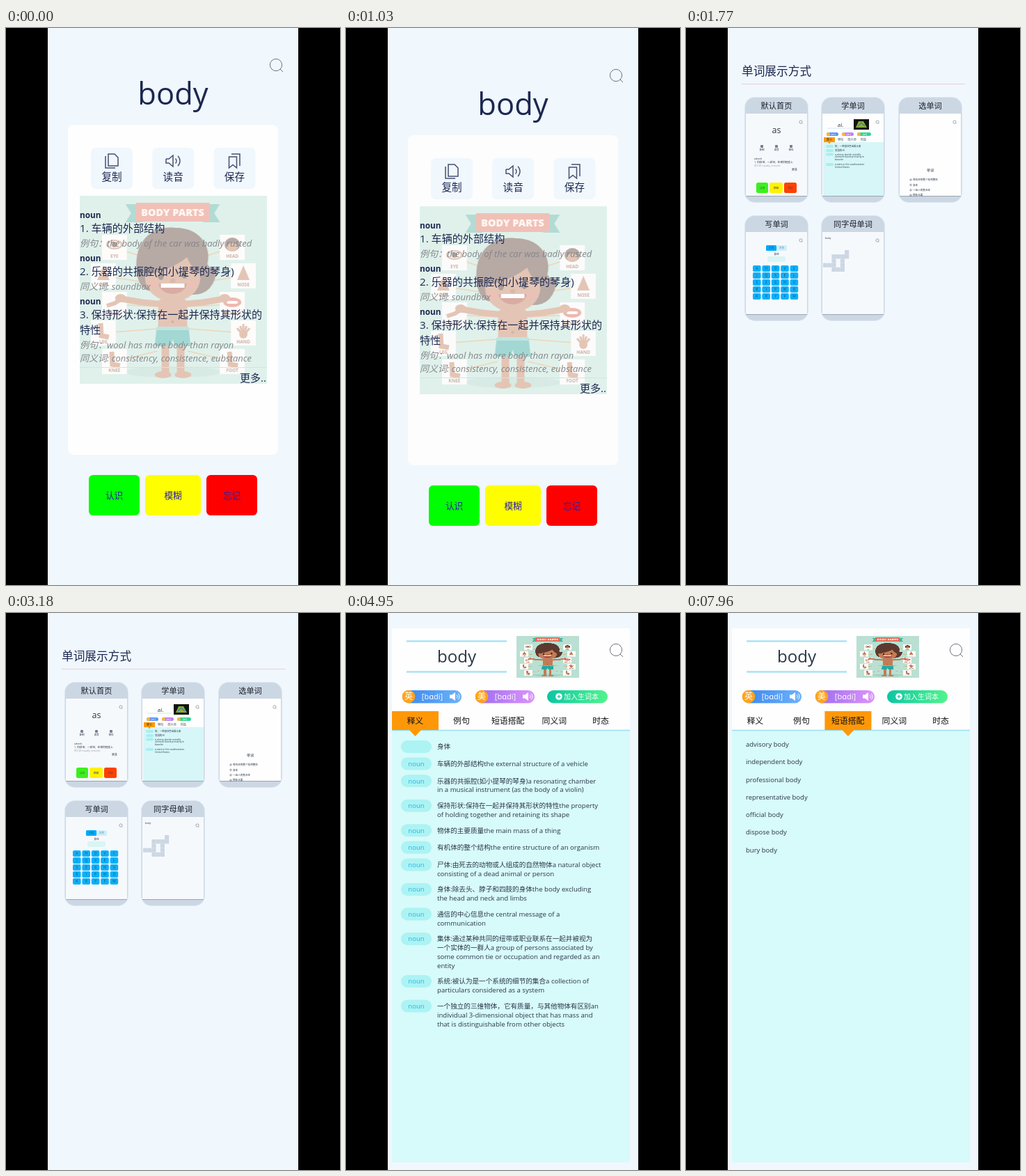
Recreate the animation shown at these times as an HTML page with a canvas. Size 480x800 px, loop 8 s.

```html
<!DOCTYPE html>
<html lang="zh">
<head>
<meta charset="utf-8">
<title>单词展示方式</title>
<style>
html, body { margin: 0; width: 100%; height: 100%; overflow: hidden; background: #000; }
canvas { display: block; width: 480px; height: 800px; }
</style>
</head>
<body>
<canvas id="stage" width="480" height="800"></canvas>
<script>
const LOOP = 8000;
const PAPER = '#f0f7fd', CARD = '#fefefe', NAVY = '#1c2850', INK = '#2a3648';
const FONT = '"Open Sans", "Noto Sans CJK SC", "Noto Sans CJK", sans-serif';
const stage = document.getElementById('stage').getContext('2d');
let c = stage;

// ---------- helpers ----------
const clamp = (v) => Math.max(0, Math.min(1, v));
const span = (t, a, b) => clamp((t - a) / (b - a));
const easeOut = (p) => 1 - (1 - p) * (1 - p);

function layer(paint) {
  const cv = document.createElement('canvas');
  cv.width = 480;
  cv.height = 800;
  c = cv.getContext('2d');
  paint();
  c = stage;
  return cv;
}

// y is the optical middle of the line
function text(str, x, y, size, color, align = 'left', style = '') {
  c.font = `${style} ${size}px ${FONT}`;
  c.fillStyle = color;
  c.textAlign = align;
  c.fillText(str, x, y + size * 0.36);
}

function rect(x, y, w, h, color, r = 0) {
  c.fillStyle = color;
  c.beginPath();
  c.roundRect(x, y, w, h, r);
  c.fill();
}

function oval(x, y, rx, ry, color, a = 0, b = Math.PI * 2) {
  c.fillStyle = color;
  c.beginPath();
  c.ellipse(x, y, rx, ry, 0, a, b);
  c.fill();
}

function line(points, color, w = 1) {
  c.strokeStyle = color;
  c.lineWidth = w;
  c.beginPath();
  points.forEach(([x, y]) => c.lineTo(x, y));
  c.stroke();
}

function poly(points, color) {
  c.fillStyle = color;
  c.beginPath();
  points.forEach(([x, y]) => c.lineTo(x, y));
  c.fill();
}

function ring(x, y, r, color, w = 1, a = 0, b = Math.PI * 2) {
  c.strokeStyle = color;
  c.lineWidth = w;
  c.beginPath();
  c.arc(x, y, r, a, b);
  c.stroke();
}

function search(x, y, s = 1) {
  ring(x, y, 8.6 * s, '#70747c', Math.max(0.6, s));
  line([[x + 6 * s, y + 6 * s], [x + 10 * s, y + 10 * s]], '#70747c', Math.max(0.6, s));
}

// ---------- illustration, drawn on a 270 x 270 grid ----------
function poster(x, y, w, h, alpha) {
  const skin = '#c27c56', hair = '#5c3a30';
  const art = layer(() => {
    rect(0, 0, 270, 270, '#b9e0d2');
    oval(134, 253, 70, 8, '#a5d2c2');
    poly([[66, 12], [90, 12], [90, 38], [66, 38], [74, 25]], '#4fae9e');
    poly([[202, 12], [178, 12], [178, 38], [202, 38], [194, 25]], '#4fae9e');
    rect(81, 10, 106, 27, '#e2705c');
    text('BODY PARTS', 134, 24, 14.5, '#fff6ea', 'center', '800');

    const labels = ['EYE,HEAD', 'EAR,NOSE', 'ARM,MOUTH', 'LEG,HAND', 'KNEE,FOOT'];
    labels.forEach((pair, i) => {
      const cy = 74 + i * 41, shift = i % 2 * 16;
      pair.split(',').forEach((name, side) => {
        const cx = side ? 220 + shift : 50 - shift;
        line([[cx, cy], [134 + (side ? 22 : -22), 95 + i * 32]], '#dca060', 1.5);
        rect(cx - 18, cy - 18, 36, 36, '#fcfbf8');
        if (i === 0 && side) {
          oval(cx, cy - 4, 11, 10, hair);
          oval(cx, cy, 8, 6, skin);
        } else if (i === 0) {
          oval(cx, cy - 4, 12, 7, skin);
          oval(cx, cy - 4, 9, 5, '#fff');
          oval(cx, cy - 4, 4, 4, hair);
        } else if (i === 2 && side) {
          oval(cx, cy - 3, 13, 7, '#d9604c');
          rect(cx - 8, cy - 5, 16, 4, '#fff', 2);
        } else if (i === 2) {
          line([[cx - 11, cy + 2], [cx + 1, cy - 2], [cx + 11, cy - 9]], skin, 6);
        } else if (i === 1) {
          poly([[cx, cy - 15], [cx + 9, cy + 6], [cx - 9, cy + 6]], skin);
        } else if (i === 3 && side) {
          for (let k = -2; k < 3; k++) line([[cx, cy + 4], [cx + k * 4.5, cy - 13 + Math.abs(k) * 3]], skin, 3);
          oval(cx, cy + 2, 6, 6, skin);
        } else {
          line([[cx - 4, cy - 14], [cx - 3, cy + 4], [cx + 8, cy + 6]], skin, 7);
        }
        text(name, cx, cy + 13, 6.5, '#8a5038', 'center', 'bold');
      });
    });

    // bob with flicked ends
    c.fillStyle = hair;
    c.beginPath();
    c.moveTo(82, 106);
    c.bezierCurveTo(78, 62, 108, 42, 138, 46);
    c.bezierCurveTo(178, 46, 190, 78, 184, 98);
    c.quadraticCurveTo(188, 106, 198, 104);
    c.quadraticCurveTo(194, 144, 160, 142);
    c.lineTo(112, 138);
    c.quadraticCurveTo(84, 140, 82, 106);
    c.fill();
    line([[60, 148], [90, 153], [134, 157], [178, 153], [208, 148]], skin, 9);
    oval(59, 147, 8, 6, skin);
    oval(209, 147, 8, 6, skin);
    rect(113, 147, 42, 52, skin, 8);
    rect(118, 205, 11, 50, skin);
    rect(140, 205, 11, 50, skin);
    oval(120, 257, 12, 5, skin);
    oval(149, 257, 12, 5, skin);
    poly([[111, 189], [157, 189], [160, 216], [137, 216], [134, 206], [131, 216], [108, 216]], '#2ca69c');
    rect(111, 188, 46, 5, '#6cc6be');
    oval(134, 181, 2, 2, '#8e5034');

    oval(134, 117, 40, 35, skin);
    c.fillStyle = hair;
    c.beginPath();
    c.moveTo(88, 116);
    c.quadraticCurveTo(92, 66, 134, 66);
    c.quadraticCurveTo(176, 66, 180, 116);
    c.quadraticCurveTo(160, 105, 155, 88);
    c.quadraticCurveTo(130, 108, 88, 116);
    c.fill();
    oval(117, 116, 4, 5, '#3a2418');
    oval(151, 114, 4, 5, '#3a2418');
    oval(106, 128, 7, 5, '#d8705c');
    oval(162, 128, 7, 5, '#d8705c');
    oval(134, 122, 4, 3, '#a45e3c');
    oval(134, 126, 20, 15, '#a8402e', 0, Math.PI);
    rect(117, 126, 34, 6, '#fff');
  });
  return () => {
    c.globalAlpha = alpha;
    c.drawImage(art, 0, 0, 270, 270, x, y, w, h);
    c.globalAlpha = 1;
  };
}
const bigPoster = poster(106, 241, 269, 270, 0.43);
const smallPoster = poster(245, 33, 90, 60, 1);

// ---------- first page ----------
function speaker(x, y, color) {
  line([[x - 10, y - 3], [x - 6, y - 3], [x, y - 8], [x, y + 8], [x - 6, y + 3], [x - 10, y + 3], [x - 10, y - 3]], color, 1.5);
  ring(x, y, 5, color, 1.4, -0.8, 0.8);
  ring(x, y, 10, color, 1.4, -0.8, 0.8);
}

function paintHome() {
  const soft = '#84868a', icon = '#465070';
  search(388, 53);
  text('body', 240, 94.5, 43.4, NAVY, 'center');
  rect(89, 139, 302, 474, CARD, 8);
  ['复制', '读音', '保存'].forEach((s, i) => {
    const x = 152 + i * 88.2;
    rect(x - 30, 172, 60, 59, PAPER, 7);
    text(s, x, 214, 14.6, NAVY, 'center');
  });
  line([[143, 184], [143, 201], [157, 201]], icon, 1.5);
  line([[147, 181], [156, 181], [161, 186], [161, 198], [147, 198], [147, 180.3]], icon, 1.5);
  speaker(240, 191, icon);
  line([[324, 181], [336, 181], [336, 198]], icon, 1.5);
  line([[320.5, 185], [331.5, 185], [331.5, 201], [326, 196.5], [320.5, 201], [320.5, 184.3]], icon, 1.5);

  bigPoster();
  line([[106, 487.5], [375, 487.5]], '#d6e2e2');
  [269, 331, 393].forEach((y) => text('noun', 106, y, 11.8, NAVY, 'left', 'bold'));
  const senses = [
    [288, '1. 车辆的外部结构'],
    [350, '2. 乐器的共振腔(如小提琴的琴身)'],
    [412, '3. 保持形状:保持在一起并保持其形状的'],
    [434, '特性']
  ];
  senses.forEach(([y, s]) => text(s, 106, y, 15.1, NAVY));
  const notes = [
    [309, '例句：the body of the car was badly rusted'],
    [371, '同义词: soundbox'],
    [455, '例句：wool has more body than rayon'],
    [474, '同义词: consistency, consistence, eubstance']
  ];
  notes.forEach(([y, s]) => text(s, 106, y, 13, soft, 'left', 'italic'));
  text('更多..', 374, 503, 15, NAVY, 'right');

  [[119, 73, '#00ff00', '认识'], [200, 80, '#ffff00', '模糊'], [288, 73, '#ff0000', '忘记']].forEach(([x, w, col, s]) => {
    rect(x, 642, w, 58, col, 6);
    text(s, x + w / 2, 671, 12.6, '#2c20a0', 'center');
  });
}

// ---------- page of display modes ----------
function card(x, y, title, color) {
  rect(x, y, 92, 152, '#dde6f0', 15);
  rect(x + 1, y + 1, 90, 150, '#ccd7e4', 14);
  text(title, x + 46, y + 12.5, 11.2, '#1c2028', 'center', '500');
  rect(x + 2, y + 24, 88, 118, color);
  line([[x + 2, y + 142.5], [x + 90, y + 142.5]], '#9ca6b2');
  search(x + 81, y + 36, 0.25);
}

function paintModes() {
  const pale = '#f6f9fc';
  text('单词展示方式', 80, 62, 16.7, NAVY);
  line([[80, 80.5], [401, 80.5]], '#e6d0d4');

  card(84, 99, '默认首页', pale);
  text('as', 130, 146, 12.5, INK, 'center');
  ['复制', '读音', '保存'].forEach((s, i) => {
    rect(107 + i * 21, 168, 4, 4, '#77808c', 1);
    text(s, 109 + i * 21, 175, 3.6, INK, 'center');
  });
  text('adverb', 98, 188, 3.4, INK);
  text('1. 同样地；一样地；在相同程度上', 98, 192.5, 3.7, INK);
  text('同义词: equally, every bit', 98, 198, 3.3, '#9498a0');
  text('更多', 160, 204, 4, INK, 'right');
  [[101, 17, '#3cf01c'], [120, 19, '#fff200'], [141, 18, '#ff4000']].forEach(([x, w, col], i) => {
    rect(x, 222, w, 15, col, 2.5);
    text(['认识', '模糊', '忘记'][i], x + w / 2, 229.5, 3.6, '#42425c', 'center');
  });

  card(194, 99, '学单词', CARD);
  rect(197, 164, 87, 77, '#d6f6f8');
  text('al.', 222, 139, 8, INK, 'center');
  line([[203, 144], [238, 144]], '#c0e4ee', 0.8);
  rect(241, 131, 22, 15, '#101410');
  poly([[244, 143], [248, 134], [255, 134], [260, 143]], '#8cae30');
  line([[247, 141], [252, 136], [257, 141]], '#3878b8', 1.2);
  [[202, 17, '#5c94f0'], [224, 17, '#c080f0'], [246, 20, '#34d494']].forEach(([x, w, col]) => {
    rect(x, 150, w, 5, col, 2.5);
    oval(x + 2.5, 152.5, 2.5, 2.5, '#f8b840');
    text('[æl]', x + w / 2 + 1, 152.5, 3.5, '#fff', 'center');
  });
  rect(198, 157, 16, 7, '#ff9900');
  ['释义', '例句', '同义词', '时态'].forEach((s, i) => text(s, 206 + i * 16.3, 160.5, 4, INK, 'center'));
  poly([[204, 164], [208, 164], [206, 166.5]], '#ff9900');
  [170, 176, 181.5, 196].forEach((y) => rect(201, y - 2, 11, 4, '#a9eef0', 2));
  ['铝；一种银白色金属元素', '美国的州', 'a silvery ductile metallic', 'element found primarily in', 'bauxite'].forEach((s, i) =>
    text(s, 214, [170, 176, 181.5, 185, 188.5][i], 3.4, INK));
  text('a state in the southeastern', 214, 196, 3.4, INK);
  text('United States', 214, 199.5, 3.4, INK);

  card(305, 99, '选单词', CARD);
  text('单词', 351, 204, 5, INK, 'center');
  ['有机体的整个结构整体', '身体', '一组人的集合体', '物体主要'].forEach((s, i) => {
    ring(323, 218 + i * 7.4, 1.2, INK, 0.5);
    text(s, 326, 218 + i * 7.4, 3.6, INK);
  });

  card(84, 269, '写单词', pale);
  rect(115, 312, 30, 8, '#cfeefa', 1.5);
  rect(115, 312, 15, 8, '#00aaf8', 1.5);
  text('小写', 122.5, 316, 3.6, '#124a70', 'center');
  text('大写', 137.5, 316, 3.6, '#387898', 'center');
  text('身体', 130, 324.5, 3.8, INK, 'center');
  rect(117, 328, 26, 8, '#d9f5f4', 2);
  for (let i = 0; i < 25; i++) {
    const x = 96 + i % 5 * 13.4, y = 341 + Math.floor(i / 5) * 10;
    rect(x, y, 11.6, 9, '#0cb0fa', 2);
    text(String.fromCharCode(65 + i * 7 % 26), x + 5.8, y + 4.5, 5, '#14506e', 'center');
  }

  card(194, 269, '同字母单词', pale);
  text('body', 200, 302, 3.6, INK);
  ['.....#', '..####', '..#.#.', '###.#.', '..###.'].forEach((row, j) =>
    [...row].forEach((v, i) => v === '#' && rect(197 + i * 6.2, 319 + j * 6.2, 6.2, 6.2, '#ccd7e4')));
}

// ---------- study page ----------
const TABS = ['释义', '例句', '短语搭配', '同义词', '时态'];
const SENSES = [
  '身体',
  '车辆的外部结构the external structure of a vehicle',
  '乐器的共振腔(如小提琴的琴身)a resonating chamber|in a musical instrument (as the body of a violin)',
  '保持形状:保持在一起并保持其形状的特性the property|of holding together and retaining its shape',
  '物体的主要质量the main mass of a thing',
  '有机体的整个结构the entire structure of an organism',
  '尸体:由死去的动物或人组成的自然物体a natural object|consisting of a dead animal or person',
  '身体:除去头、脖子和四肢的身体the body excluding|the head and neck and limbs',
  '通信的中心信息the central message of a|communication',
  '集体:通过某种共同的纽带或职业联系在一起并被视为|一个实体的一群人a group of persons associated by|some common tie or occupation and regarded as an|entity',
  '系统:被认为是一个系统的细节的集合a collection of|particulars considered as a system',
  '一个独立的三维物体，它有质量，与其他物体有区别an|individual 3-dimensional object that has mass and|that is distinguishable from other objects'
];
const PHRASES = ['advisory', 'independent', 'professional', 'representative', 'official', 'dispose', 'bury'];
const THINGS = [['car', '汽车'], ['ship', '轮船'], ['plane', '飞机'], ['train', '火车'], ['bus', '公共汽车']];
const STATES = [['badly rusted', '严重生锈了'], ['painted blue', '漆成了蓝色'], ['made of steel', '由钢制成'], ['well protected', '保护得很好']];

function pill(x, w, from, to) {
  const g = c.createLinearGradient(x, 0, x + w, 0);
  g.addColorStop(0, from);
  g.addColorStop(1, to);
  rect(x, 111, w, 18.5, g, 9.25);
}

function paintStudy() {
  rect(60, 0, 360, 800, PAPER);
  rect(66, 22, 342, 767, CARD);
  rect(66, 168, 342, 621, '#d7fafa');
  line([[66, 168.5], [408, 168.5]], '#9cdcf2', 1.5);
  line([[87, 40.5], [231, 40.5]], '#aae2f6', 2.6);
  line([[87, 84.5], [231, 84.5]], '#aae2f6', 2.6);
  text('body', 159, 62.5, 24, INK, 'center');
  smallPoster();
  search(388, 53);
  [[81, '#3a86ee', '#6cb2fa', '英'], [186, '#9a6cf0', '#dd94fa', '美']].forEach(([x, a, b, s]) => {
    pill(x, 85, a, b);
    oval(x + 9, 120, 9.3, 9.3, '#ffa41c');
    text(s, x + 9, 120, 12, '#fff', 'center', '500');
    text('[bɑdi]', x + 43, 120, 11, '#fff', 'center');
    poly([[68, 117.5], [71, 117.5], [76, 114], [76, 126], [71, 122.5], [68, 122.5]].map(([u, v]) => [u + x, v]), '#fff');
    ring(x + 76, 120, 3.2, '#fff', 1, -0.9, 0.9);
    ring(x + 76, 120, 6, '#fff', 1, -0.8, 0.8);
  });
  pill(289, 87, '#0cc6a4', '#52f48c');
  oval(306, 120, 4.8, 4.8, '#fff');
  line([[303.5, 120], [308.5, 120]], '#1cbf9c', 1.2);
  line([[306, 117.5], [306, 122.5]], '#1cbf9c', 1.2);
  text('加入生词本', 313, 120, 10, '#fff');
}

function drawTabs(active) {
  const x = 66 + active * 66.7;
  rect(x, 141, 67, 27, '#ff9808');
  poly([[x + 24, 167], [x + 43, 167], [x + 33.5, 177]], '#ff9808');
  TABS.forEach((s, i) => text(s, 99.3 + i * 66.7, 155, 11.9, '#101214', 'center', '500'));
}

function drawSenses() {
  let y = 192;
  SENSES.forEach((sense, i) => {
    const rows = sense.split('|');
    rect(79, y - 9, 44, 18, '#acf3f3', 9);
    if (i) text('noun', 101, y, 9.6, '#24b4ee', 'center');
    rows.forEach((s, k) => text(s, 131, y + k * 12.8, 9.6, INK));
    y += Math.max(24.6, 22.7 + 12.8 * (rows.length - 1));
  });
}

function drawExamples(scroll) {
  for (let i = 0; i < 20; i++) {
    const [thing, zhThing] = THINGS[i % 5], [state, zhState] = STATES[i % 4];
    const y = 188 + i * 42 - scroll;
    text(`the body of the ${thing} was ${state}`, 86, y, 9.6, INK);
    text(`${zhThing}的外壳${zhState}`, 86, y + 15, 9.6, INK);
  }
}

function drawStudy(t) {
  c.drawImage(study, 0, 0);
  const tab = t < 4985 ? 0 : t < 7920 ? 1 : 2;
  c.save();
  c.beginPath();
  c.rect(66, 169, 342, 620);
  c.clip();
  if (tab === 0) drawSenses();
  else if (tab === 1) {
    drawExamples(90 * easeOut(span(t, 5100, 5690)) + 110 * easeOut(span(t, 5810, 6600)) + 30 * easeOut(span(t, 6640, 7010)));
  } else PHRASES.forEach((s, i) => text(s + ' body', 86, 188.5 + i * 25.3, 9.5, INK));
  c.restore();
  drawTabs(tab);
}

// ---------- timeline ----------
const home = layer(paintHome);
const modes = layer(paintModes);
const study = layer(paintStudy);
const studyStart = layer(() => drawStudy(4200));

function put(img, alpha, dy = 0) {
  if (alpha <= 0) return;
  c.globalAlpha = alpha;
  c.drawImage(img, 0, Math.round(dy));
  c.globalAlpha = 1;
}

function draw(t) {
  rect(0, 0, 480, 800, '#000');
  c.save();
  c.beginPath();
  c.rect(60, 0, 360, 800);
  c.clip();
  rect(60, 0, 360, 800, PAPER);
  if (t < 1450) {
    put(home, 1 - span(t, 1030, 1450), 155 * span(t, 870, 1395) ** 2);
  } else if (t < 4120) {
    const p = span(t, 3750, 4120);
    put(modes, span(t, 1450, 1690) * (1 - p));
    put(studyStart, p);
  } else drawStudy(t);
  c.restore();
}

const start = performance.now();
function tick() {
  draw((performance.now() - start) % LOOP);
  requestAnimationFrame(tick);
}
tick();
</script>
</body>
</html>
```
